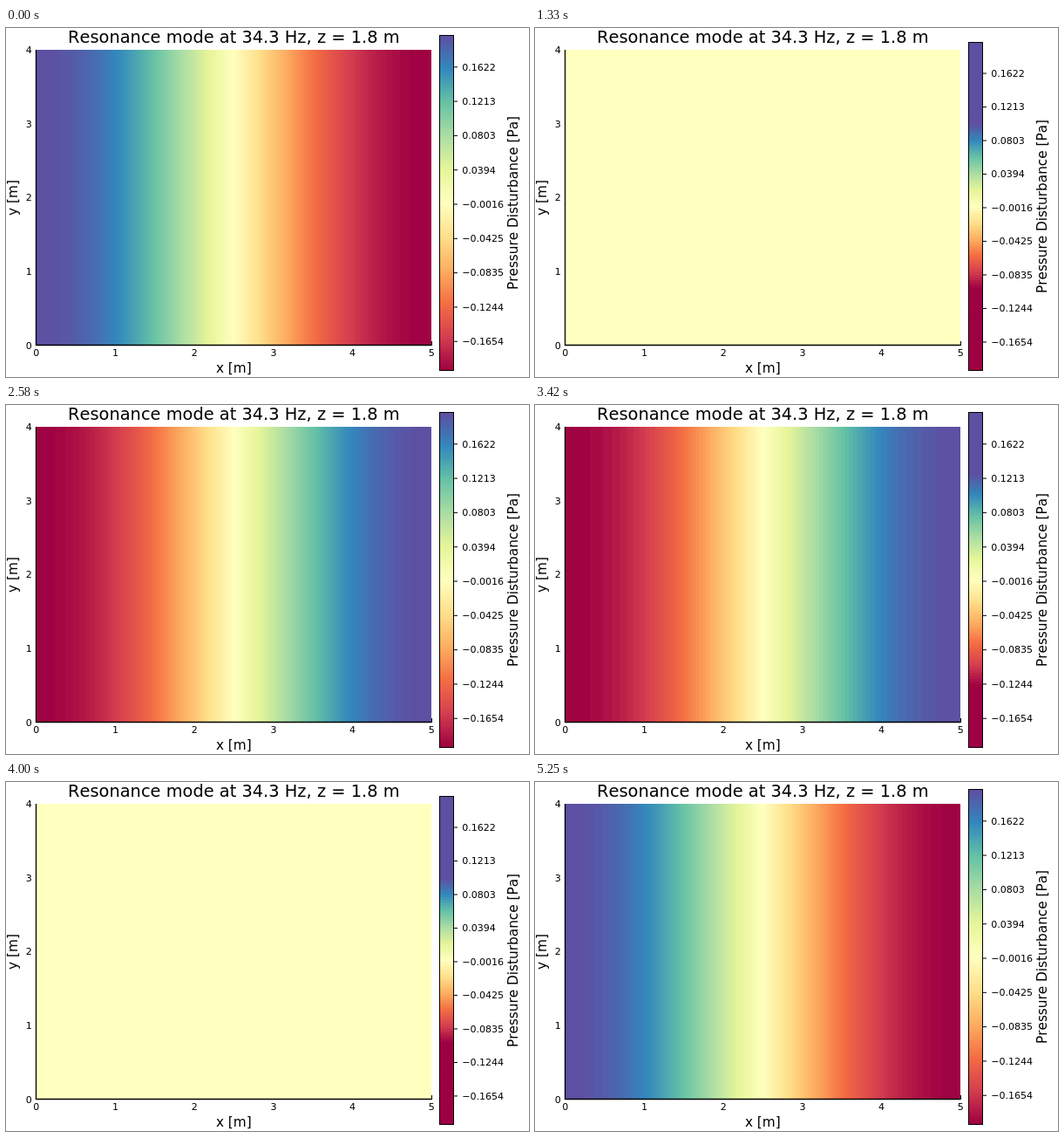
Recreate the animation shown at these times as an HTML page. Size 600 px wide and 400 px high, loop 5.33 s.

```html
<!DOCTYPE html>
<html lang="en">
<head>
<meta charset="utf-8">
<title>Resonance mode</title>
<style>
  html, body { margin: 0; width: 100%; height: 100%; overflow: hidden; background: #fff; }
  svg { display: block; width: 600px; height: 400px; }
  text { font-family: "DejaVu Sans", sans-serif; font-kerning: none; fill: #000; }
  .title { font-size: 19.4px; }
  .guide { font-size: 15.3px; }
  .tick { font-size: 11.05px; }
  .mid { text-anchor: middle; }
  .end { text-anchor: end; }
  .line { fill: none; stroke: #000; stroke-width: 1.3; }
  .thin { fill: none; stroke: #000; stroke-width: 1; }
</style>
</head>
<body>
<svg id="stage" viewBox="0 0 600 400"></svg>
<script>
const LOOP = 5330, FRAMES = 64;
const PEAK = 0.2, BANDS = 127;
const plot = { left: 34.5, right: 488, top: 25, bottom: 363.5 };
const bar = { left: 497.5, width: 16, bottom: 392.5 };
const spectral = ['9e0142', 'd53e4f', 'f46d43', 'fdae61', 'fee08b', 'ffffbf',
  'e6f598', 'abdda4', '66c2a5', '3288bd', '5e4fa2']
  .map(hex => [0, 2, 4].map(i => parseInt(hex.slice(i, i + 2), 16)));

const stage = document.getElementById('stage');
const clamp = (v, lo, hi) => Math.min(hi, Math.max(lo, v));

function add(tag, attrs, text) {
  const el = document.createElementNS('http://www.w3.org/2000/svg', tag);
  set(el, attrs);
  if (text !== undefined) el.textContent = text;
  return stage.appendChild(el);
}

function set(el, attrs) {
  for (const key in attrs) el.setAttribute(key, attrs[key]);
}

function label(text, x, y, cls) {
  return add('text', { x, y, class: cls }, text);
}

const upright = (x, y) => `translate(${x} ${y}) rotate(-90)`;

// v runs from -1 to 1 across the colour scale
function colour(v) {
  const p = clamp((v + 1) / 2, 0, 1) * 10;
  const i = Math.min(9, Math.floor(p));
  const rgb = spectral[i].map((c, n) => Math.round(c + (spectral[i + 1][n] - c) * (p - i)));
  return `rgb(${rgb})`;
}

const width = plot.right - plot.left;
const height = plot.bottom - plot.top;
const field = Array.from({ length: BANDS }, () => add('rect', { y: plot.top, height }));
const cells = Array.from({ length: BANDS }, () => add('rect', { x: bar.left, width: bar.width }));

add('path', { class: 'line', d: `M${plot.left} ${plot.top}V${plot.bottom}H${plot.right}` });
// Only the last x tick clears the field
add('path', { class: 'thin', d: `M${plot.right + 0.5} ${plot.bottom + 0.5}v-5` });
label('Resonance mode at 34.3 Hz, z = 1.8 m', 261.3, 17, 'title mid');
label('x [m]', 261.3, 394.6, 'guide mid');
set(label('y [m]', 0, 0, 'guide mid'), { transform: upright(12.7, 194.5) });
for (let i = 0; i <= 5; i++) {
  label(i, plot.left + 0.3 + width * i / 5, 376.4, 'tick mid');
}
for (let i = 0; i <= 4; i++) {
  label(i, 29.8, plot.bottom - height * i / 4 + 4, 'tick end');
}

const frame = add('rect', { class: 'thin', x: bar.left, width: bar.width });
const barGuide = label('Pressure Disturbance [Pa]', 0, 0, 'guide mid');
const barTicks = [];
for (let n = 11; n <= 115; n += 13) {
  const value = PEAK * (2 * n / BANDS - 1);
  barTicks.push({
    n,
    mark: add('path', { class: 'thin' }),
    text: label(value.toFixed(4).replace('-', '\u2212'), 523.2, 0, 'tick')
  });
}

function drawField(amp, sign, range) {
  field.forEach((el, j) => {
    const edge = PEAK * (1 - 2 * j / BANDS);
    const centre = PEAK * (1 - (2 * j + 1) / BANDS);
    const x = plot.left + width * Math.acos(clamp(edge / amp, -1, 1)) / Math.PI;
    set(el, { x, width: plot.right - x, fill: colour(sign * centre / range) });
  });
}

function drawBar(top, range) {
  const size = bar.bottom - top;
  cells.forEach((el, j) => {
    const y = top + size * j / BANDS;
    const centre = PEAK * (1 - (2 * j + 1) / BANDS);
    set(el, { y, height: bar.bottom - y, fill: colour(centre / range) });
  });
  set(frame, { y: top, height: size });
  set(barGuide, { transform: upright(587, (top + bar.bottom) / 2) });
  for (const { n, mark, text } of barTicks) {
    const y = bar.bottom - size * n / BANDS;
    set(mark, { d: `M${bar.left + bar.width} ${y}h4.5` });
    set(text, { y: y + 3.8 });
  }
}

let shown = -1;

function draw(ms) {
  // Twelve steps a second, switching on whole hundredths
  const step = Math.floor((Math.floor((ms % LOOP) / 10) + 0.5) * 0.12);
  if (step === shown) return;
  shown = step;
  const wave = Math.cos(2 * Math.PI * step / FRAMES);
  const amp = PEAK * Math.abs(wave);
  const flat = amp < 1e-9;
  const range = flat ? 0.1 : amp;
  drawField(Math.max(amp, 1e-12), Math.sign(wave), range);
  drawBar(flat ? 16.5 : 8.5, range);
}

const start = performance.now();
function tick() {
  draw(performance.now() - start);
  requestAnimationFrame(tick);
}
tick();
</script>
</body>
</html>
```
